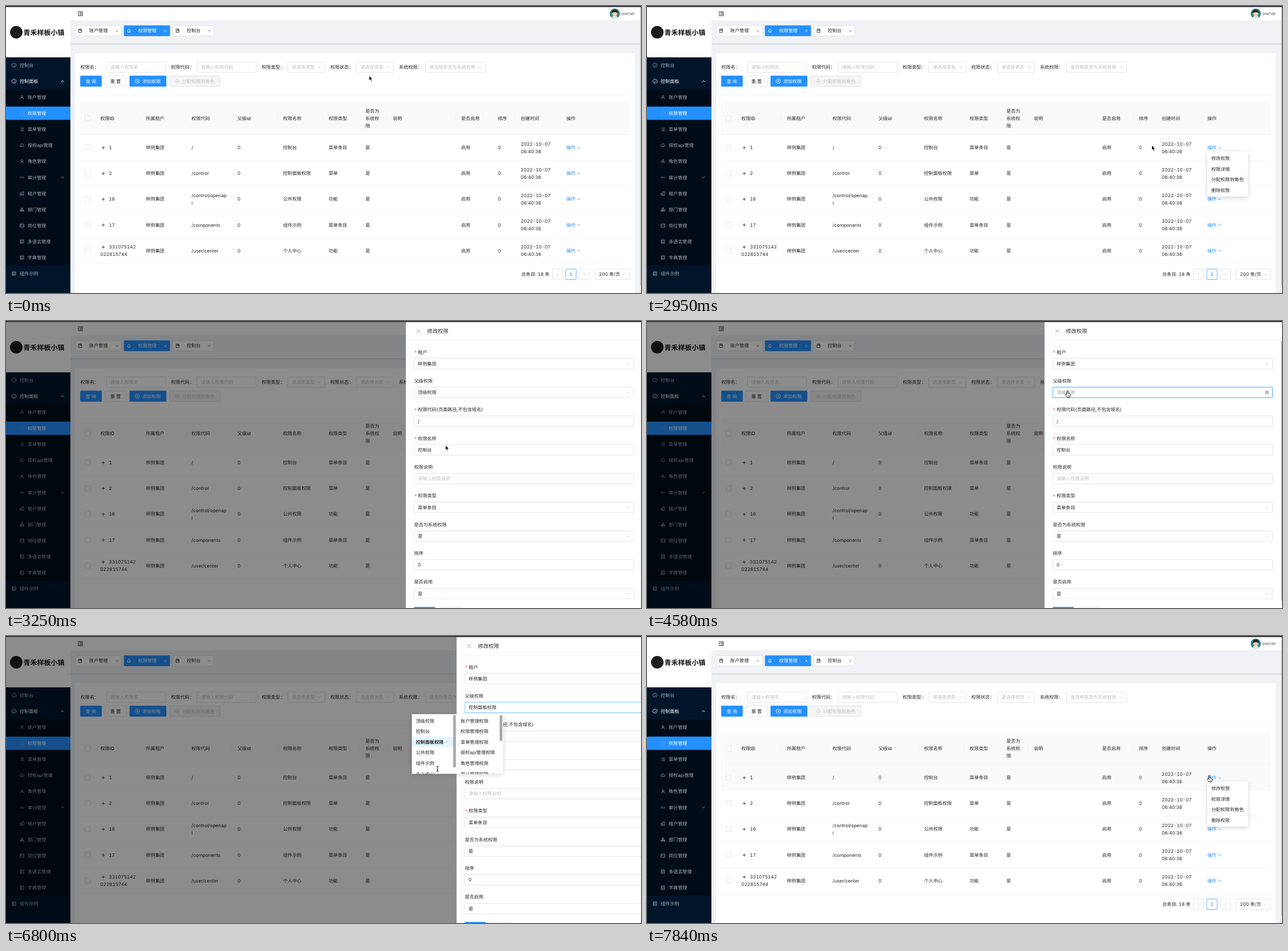
These frames come from a looping animation (1114x503 px, 7990 ms). An HTML page:

```html
<!DOCTYPE html>
<html lang="zh-CN">
<head>
<meta charset="utf-8">
<title>权限管理</title>
<style>
html, body { margin: 0; width: 100%; height: 100%; overflow: hidden; background: #f0f2f5; }
svg { display: block; width: 100%; height: 100%; }
text {
  font: 8.12px Inter, "Noto Sans CJK SC", "Noto Sans CJK", "Noto Sans", sans-serif;
  font-variant-numeric: tabular-nums;
  text-rendering: geometricPrecision;
  white-space: pre;
}
.med { font-weight: 500; }
.bold { font-weight: 700; }
.title { font-size: 9.28px; font-weight: 500; }
.brand { font-size: 12px; font-weight: 700; }
.pop { filter: drop-shadow(0 2px 4px rgba(0, 0, 0, .16)); }
</style>
</head>
<body>
<svg id="stage" viewBox="0 0 1114 503"></svg>
<script>
const BLUE = '#2490ff', INK = '#262626', HINT = '#bfbfbf', LINE = '#d9d9d9', SOFT = '#f0f0f0';
const TENANT = '样例集团';

// ---- drawing helpers (boxes are given by their edges, text by its middle line)
const text = (x, cy, s, fill = INK, cls = '', extra = '') =>
  `<text x="${x}" y="${cy + 3}" fill="${fill}" class="${cls}" ${extra}>${s}</text>`;
const rect = (x1, y1, x2, y2, fill, extra = '') =>
  `<rect x="${x1}" y="${y1}" width="${x2 - x1}" height="${y2 - y1}" fill="${fill}" ${extra}/>`;
const box = (x1, y1, x2, y2, fill = '#fff', stroke = LINE, extra = '') =>
  rect(x1, y1, x2, y2, fill, `rx="1" stroke="${stroke}" stroke-width=".7" ${extra}`);
const path = (d, stroke = INK, w = .8, fill = 'none') =>
  `<path d="${d}" stroke="${stroke}" stroke-width="${w}" fill="${fill}" stroke-linejoin="round"/>`;
const at = (x, y, s) => `<g transform="translate(${x} ${y})">${s}</g>`;
const group = (id, s, extra = '') => `<g id="${id}" ${extra}>${s}</g>`;
const down = (x, y, c = HINT) => at(x, y, path('M-2.6-1.3L0 1.4L2.6-1.3', c));
const cross = (x, y, r, c) => at(x, y, path(`M${-r} ${-r}L${r} ${r}M${r} ${-r}L${-r} ${r}`, c, .7));
const hline = (x1, x2, y, c = SOFT) => path(`M${x1} ${y}H${x2}`, c, .6);

const ICONS = {
  gauge: 'M-2.5 2.8A3.8 3.8 0 1 1 2.5 2.8ZM0 .8L1.6-1.2',
  user: 'M-1.7-1.4a1.7 1.7 0 1 1 3.4 0a1.7 1.7 0 1 1-3.4 0M-3 3Q-2.6.6 0 .6T3 3',
  list: 'M-1.6-2.4H3.4M-1.6 0H3.4M-1.6 2.4H3.4M-3.4-2.4h.8M-3.4 0h.8M-3.4 2.4h.8',
  cloud: 'M-2 2.4A1.9 1.9 0 0 1-2.3-1.2A2.4 2.4 0 0 1 2.3-1.2A1.9 1.9 0 0 1 2 2.4M-1 1.4a1 1 0 1 1 2 0a1 1 0 1 1-2 0',
  code: 'M-1.8-1.6L-3.4 0L-1.8 1.6M1.8-1.6L3.4 0L1.8 1.6M0-1.6V1.6',
  house: 'M-3.4 3V-.5H0V-3H3V3ZM-2 1.2H1.6',
  tree: 'M-.9-3H.9V-1.2H-.9ZM0-1.2V.3M-2.6 1.5V.3H2.6V1.5M-3.4 1.5h1.6V3h-1.6ZM1.8 1.5h1.6V3h-1.6ZM-.8 1.5H.8V3H-.8Z',
  card: 'M-3.6-2.8H3.6V2.8H-3.6ZM-2.2-.4a.8.8 0 1 1 1.6 0a.8.8 0 1 1-1.6 0M1-1H2.6M1 .8H2.6',
  book: 'M-3-3H3V3H-3ZM-1.4-3V3M0-1H2M0 1H2',
  fold: 'M-4.6-3.4H4.6M-1.2-1.2H4.6M-1.2 1.2H4.6M-4.6 3.4H4.6M-2.4-1.6L-4.4 0L-2.4 1.6',
  page: 'M-2.6-3H2.6V3H-2.6ZM-.6-3V.2L.4-.6L1.4.2V-3',
  bell: 'M-2 2V-.4A2 2 0 0 1 2-.4V2M-2.8 2H2.8M-.6 3.2H.6M0-2.4V-3.2',
  add: 'M-3.8 0a3.8 3.8 0 1 1 7.6 0a3.8 3.8 0 1 1-7.6 0M-1.8 0H1.8M0-1.8V1.8'
};
const icon = (name, x, y, c, w = .8) => at(x, y, path(ICONS[name], c, w));

// ---- page
function sidebar() {
  const dim = '#a6adb4', step = 28.1;
  const subs = [['账户管理', 'user'], ['权限管理', 'gauge'], ['菜单管理', 'list'], ['授权api管理', 'cloud'],
    ['角色管理', 'user'], ['审计管理', 'code'], ['租户管理', 'house'], ['部门管理', 'tree'],
    ['岗位管理', 'card'], ['多语言管理', 'book'], ['字典管理', 'book']];
  return rect(0, 2, 113, 90, '#fff') +
    '<circle cx="18" cy="46" r="11" fill="#1a1a1a"/>' + text(30.5, 46.3, '青禾样板小镇', '#111', 'brand', 'dy="1.4"') +
    rect(0, 90, 113, 503, '#001529') + rect(0, 146, 113, 455, '#000c17') + rect(0, 176.3, 113, 199.6, BLUE) +
    icon('gauge', 14, 104, dim) + text(24, 104, '控制台', dim) +
    icon('gauge', 14, 132, '#fff') + text(24, 132, '控制面板', '#fff', 'med') +
    path('M96.6 133.3L99.2 130.7L101.8 133.3', '#fff', 1) +
    subs.map(([s, ic], i) => {
      const y = 160 + i * step, c = i === 1 ? '#fff' : dim;
      return icon(ic, 28, y, i === 1 ? '#5f9fd8' : dim, .7) + text(38, y, s, c);
    }).join('') + down(99.2, 300, dim) +
    icon('book', 14, 469, dim) + text(24, 469, '组件示例', dim);
}

function topBar() {
  const avatar = '<circle r="9" fill="#2b8c83"/><path d="M-5.4 7.2Q-4 3.4 0 3.4T5.4 7.2A9 9 0 0 1-5.4 7.2Z" fill="#e9e4e0"/>' +
    '<circle cy="-.2" r="4.6" fill="#f0cdb8"/><path d="M-5.4 0Q-6-6.6 0-6.8T5.4 0Q4-2.6 0-2.6T-5.4 0Z" fill="#1f1c20"/>';
  const tab = (x1, x2, s, on) => {
    const c = on ? '#fff' : INK;
    return box(x1, 34.3, x2, 52.4, on ? BLUE : '#fff', on ? BLUE : LINE) +
      icon(on ? 'bell' : 'page', x1 + 8.4, 43.4, c) + text(x1 + 24.6, 43.4, s, c) +
      cross(x2 - 7.8, 43.6, 2, on ? '#fff' : '#777');
  };
  return rect(113, 2, 1114, 25, '#fff') + icon('fold', 130.4, 13.5, INK, 1) +
    at(1068, 13.3, avatar) + text(1079.5, 13.4, 'owner', '#666') +
    rect(113, 65.6, 1112, 66.8, '#cfd1d4') + rect(113, 66.8, 1112, 68.5, '#e6e8eb') +
    tab(121.5, 202.3, '账户管理') + tab(207.2, 287.3, '权限管理', true) + tab(292.5, 364.5, '控制台');
}

function filters() {
  const field = (x, label, x1, x2, hint, select) => text(x, 107, label + '：') + box(x1, 98, x2, 116.3) +
    text(x1 + 6.8, 107, hint, HINT) + (select ? down(x2 - 9.6, 107.2) : '');
  const button = (x1, x2, tx, s, fill, stroke, c) => box(x1, 122.4, x2, 141, fill, stroke) + text(tx, 131.7, s, c);
  return field(130.5, '权限名', 176.3, 280, '请输入权限名') + field(289.5, '权限代码', 335.3, 439, '请输入权限代码') +
    field(448.5, '权限类型', 494.3, 559.5, '请选择类型', 1) + field(569, '权限状态', 614.8, 680, '请选择状态', 1) +
    field(689.5, '系统权限', 735.5, 841.3, '请选择是否为系统权限', 1) +
    group('focus', box(614.8, 98, 680, 116.3, 'none', '#cfe6ff', 'style="stroke-width:2.6"') +
      box(614.8, 98, 680, 116.3, 'none', '#40a0ff', 'style="stroke-width:.9"')) +
    button(130.5, 167.8, 139.8, '查 询', BLUE, BLUE, '#fff') + button(173.8, 211, 183, '重 置', '#fff', LINE, INK) +
    button(217, 281, 239, '添加权限', BLUE, BLUE, '#fff') + icon('add', 230.4, 131.7, '#fff') +
    button(287.2, 375.7, 309, '分配权限到角色', '#f5f5f5', LINE, HINT) + icon('cloud', 300.4, 131.7, HINT) +
    hline(130, 1094, 156);
}

function table() {
  const check = y => box(138.6, y - 4.6, 147.8, y + 4.6);
  const heads = [[165.5, '权限ID'], [245.5, '所属租户'], [325.5, '权限代码'], [406, '父级id'], [486, '权限名称'],
    [566, '权限类型'], [678.5, '说明'], [798.5, '是否启用'], [863, '排序'], [903, '创建时间'], [983, '操作']];
  const rows = [['1', '/', '控制台', '菜单条目'], ['2', '/control', '控制面板权限', '菜单'],
    ['16', '/control/openap|i', '公共权限', '功能'], ['17', '/components', '组件示例', '菜单条目'],
    ['331075142|022815744', '/user/center', '个人中心', '功能']];
  let s = rect(130, 168, 1094, 225.4, '#fafafa') + check(197) +
    heads.map(([x, h], i) => text(x, 197, h, INK, 'med') + (i ? path(`M${x - 9.6} 190.5V203.5`, '#ececec', .6) : '')).join('') +
    ['是否为', '系统权', '限'].map((h, i) => text(630.5, 184 + 13 * i, h, INK, 'med')).join('') +
    path('M620.8 190.5V203.5', '#ececec', .6) + hline(130, 1094, 225.5) +
    group('hover', rect(130, 225.8, 1094, 270.3, '#fafafa'));
  rows.forEach(([id, code, name, kind], i) => {
    const y = 248.1 + i * 45.15, ids = id.split('|'), codes = code.split('|');
    const top = y - (ids.length - 1) * 6.5;
    s += check(y) + path(`M167.8 ${top + .3}H173.4M170.6 ${top - 2.5}V${top + 3.1}`, INK, .8) + text(180.4, top, ids[0]);
    if (ids[1]) s += text(165.5, y + 6.5, ids[1]);
    codes.forEach((c, k) => s += text(325.5, y + (codes.length - 1) * -6.5 + 13 * k, c));
    s += text(245.5, y, TENANT) + text(406, y, '0') + text(486, y, name) + text(566, y, kind) + text(630.5, y, '是') +
      text(798.5, y, '启用') + text(863, y, '0') + text(903, y - 6.3, '2022-10-07') + text(903, y + 6.5, '06:40:36') +
      text(983, y, '操作', BLUE) + down(1004.6, y + .2, BLUE) + hline(130, 1094, y + 22.6);
  });
  return s + text(904, 470, '总条目: 18 条') + box(958.6, 461, 976.8, 479.4) + path('M969 467.6L966.3 470.2L969 472.8', HINT) +
    box(982, 461, 1000.2, 479.4, '#fff', BLUE) + text(991.1, 470, '1', BLUE, 'med', 'text-anchor="middle"') +
    box(1005.4, 461, 1023.6, 479.4) + path('M1013.2 467.6L1015.9 470.2L1013.2 472.8', HINT) +
    box(1033.5, 461, 1093.8, 479.4) + text(1040.3, 470, '200 条/页') + down(1084, 470.2);
}

// ---- drawer: label, value, required, select
const FIELDS = [['租户', TENANT, 1, 1], ['父级权限', '顶级权限', 0, 1], ['权限代码(页面路径,不包含域名)', '/', 1, 0],
  ['权限名称', '控制台', 1, 0], ['权限说明', '请输入权限说明', 0, 0], ['权限类型', '菜单条目', 1, 1],
  ['是否为系统权限', '是', 0, 1], ['排序', '0', 0, 0], ['是否启用', '是', 0, 1]];
function drawer() {
  return rect(697.5, 2, 1116, 503, '#fff') + cross(719.6, 17.6, 3.2, '#777') + text(735, 17.6, '修改权限', INK, 'title') +
    hline(697.5, 1116, 34) +
    FIELDS.map(([label, value, must, select], i) => {
      const y = 54.5 + i * 50.37, iy = y + 20.3;
      return (must ? text(712, y + .6, '*', '#ff4d4f') : '') + text(must ? 718.8 : 712, y, label) +
        box(712, iy - 9.2, 1097.6, iy + 9.2, '#fff', LINE, `id="field${i}"`) +
        text(718.6, iy, value, i === 4 ? HINT : INK, '', `id="value${i}"`) +
        (select ? group('arrow' + i, down(1087.6, iy + .2)) : '');
    }).join('') +
    group('clear', '<circle cx="1087.6" cy="125.2" r="3.2" fill="#b0b0b0"/>' + cross(1087.6, 125.2, 1.2, '#fff')) +
    box(712, 501.5, 748.7, 520, BLUE, BLUE) + box(757.5, 501.5, 795, 520) +
    rect(1112.6, 36, 1114, 490, '#a8a8a8');
}

// ---- popups
const popup = (id, x1, y1, x2, y2, s) => group(id, rect(x1, y1, x2, y2, '#fff', 'rx="1" class="pop"') + s);
const lines = (x, y, gap, list) => list.map((s, i) => text(x, y + gap * i, s)).join('');
function popups() {
  const next = (x, y) => path(`M${x - 1.2} ${y - 2}L${x + 1} ${y}L${x - 1.2} ${y + 2}`, '#999', .7);
  const bar = (x, y2) => rect(x, 138.5, x + 4.8, y2, '#a9a9a9', 'rx="2.2"');
  const y0 = 148.6, gap = 18.75;
  const first = ['顶级权限', '控制台', '控制面板权限', '公共权限', '组件示例', '个人中心'];
  const second = ['账户管理权限', '权限管理权限', '菜单管理权限', '授权api管理权限', '角色管理权限', '审计管理权限'];
  const mark = (id, i) => group(id, rect(712, y0 + gap * i - 9.3, 784.5, y0 + gap * i + 9.3, '#e6f7ff') +
    text(719, y0 + gap * i, first[i], INK, 'bold'));
  const column = first.map((s, i) => text(719, y0 + gap * i, s, INK, '', `id="opt${i}"`)).join('');
  return popup('states', 614.8, 119.4, 680, 161.6, lines(621.6, 131.2, 18.6, ['启用', '禁用'])) +
    popup('menu', 983, 255, 1054.3, 334, lines(990, 266.9, 18.6, ['修改权限', '权限详情', '分配权限到角色', '删除权限'])) +
    group('cascade',
      group('wide', rect(712, 137, 872, 242.2, '#fff', 'class="pop"')) +
      group('narrow', rect(712, 137, 790, 242.2, '#fff', 'class="pop"')) +
      '<clipPath id="cut"><rect x="712" y="137" width="160" height="105.2"/></clipPath><g clip-path="url(#cut)">' +
      mark('mark0', 0) + mark('mark2', 2) + column + next(773, y0 + gap * 2) + bar(784.4, 231) +
      group('second', path('M790 137V242.2', SOFT, .6) + lines(797.6, y0, gap, second) + next(855, y0 + gap * 5) + bar(866, 184.5)) +
      '</g>');
}

function cursors() {
  const finger = 'M-1.2 6V.6Q-1.2-.6 0-.6T1.1.6V4Q4.4 3.6 5.2 5.4Q5.6 8.4 3.8 10.6H-.6Q-2 8.6-3 7Q-3.6 5.4-2.4 5.4Z';
  return group('arrow', path('M0 0V9L2.1 7.1L3.6 10.3L5.1 9.6L3.6 6.5H6.4Z', '#fff', .9, '#000')) +
    group('hand', path(finger, '#000', .9, '#fff') + path('M.8 7V9M2.6 7V9', '#000', .5)) +
    group('beam', path('M-2-4.5Q0-4.5 0-3.5Q0-4.5 2-4.5M0-3.5V3.5M-2 4.5Q0 4.5 0 3.5Q0 4.5 2 4.5M-1 1.4H1', '#000', .9));
}

document.getElementById('stage').innerHTML =
  rect(0, 0, 1114, 503, '#f0f2f5') + topBar() + rect(121.3, 83, 1103, 503, '#fff') + filters() + table() +
  rect(1112.6, 2, 1114, 490, '#c4c4c4') + sidebar() +
  group('mask', rect(0, 0, 1114, 503, '#000')) + group('drawer', drawer()) + popups() +
  rect(0, 0, 1114, 2, '#3d4043') + group('cursor', cursors());

const LOOP = 7990, TICK = 147.9, LAST = 53;
const PATH = [[0, 637, 122], [1, 636, 114], [2, 634, 105], [4, 632, 106], [5, 624, 106], [6, 624, 106], [7, 690, 130],
  [11, 965, 235], [12, 992, 246], [13, 992.5, 247.5], [14, 993, 249], [17, 997, 266], [19, 997, 266], [21, 774, 222],
  [27, 756, 195], [28, 752, 130], [29, 746, 78], [31, 737.7, 122.8], [33, 737.7, 122.8], [35, 738, 170], [37, 745, 183],
  [42, 745, 183], [43, 715, 195], [45, 610.5, 221], [46, 757, 233], [49, 960, 252], [50, 990, 250], [53, 986.5, 245]];
const SHIFT = [[20, 420], [21, 140.5], [22, 4], [23, 0], [45, 0], [46, 93], [47, 385], [48, 420]];
const STATES = [[1, 0], [2, .88], [3, 1], [4, 1], [5, 0]];
const MENU = [[11, 0], [12, .88], [13, .986], [14, 1], [21, 1], [22, 0], [51, 0], [52, .92], [53, 1]];
const CASCADE = [[31, 0], [32, .9], [33, 1], [45, 1], [46, .994], [47, 0]];

function track(keys, n, k = 1) {
  if (n <= keys[0][0]) return keys[0][k];
  for (let i = 1; i < keys.length; i++) {
    const a = keys[i - 1], b = keys[i];
    if (n <= b[0]) return a[k] + (b[k] - a[k]) * (n - a[0]) / (b[0] - a[0]);
  }
  return keys[keys.length - 1][k];
}

const $ = id => document.getElementById(id);
const show = (id, on) => $(id).setAttribute('visibility', on ? 'inherit' : 'hidden');
const within = (n, a, b) => n >= a && n <= b;

function unfold(id, top, s) {
  show(id, s > 0);
  $(id).setAttribute('transform', `translate(0 ${top * (1 - s)}) scale(1 ${s || 1})`);
  $(id).setAttribute('opacity', Math.min(1, Math.max(0, (s - .8) / .15)));
}

function border(i, c, w) {
  $('field' + i).setAttribute('stroke', c);
  $('field' + i).setAttribute('stroke-width', w);
}

function draw(n) {
  show('focus', within(n, 2, 19));
  show('hover', within(n, 12, 14) || n >= 50);
  unfold('states', 119.4, track(STATES, n));
  unfold('menu', 255, track(MENU, n));
  unfold('cascade', 137, track(CASCADE, n));

  const shift = track(SHIFT, n);
  show('drawer', shift < 418);
  $('drawer').setAttribute('transform', `translate(${shift} 0)`);
  $('mask').setAttribute('opacity', .45 * Math.min(1, 1.4 * (1 - shift / 420)));

  const chosen = n >= 41, editing = within(n, 31, 45), clear = within(n, 30, 34);
  for (const id of ['wide', 'second', 'mark2']) show(id, chosen);
  for (const id of ['narrow', 'mark0', 'opt2']) show(id, !chosen);
  show('opt0', chosen);
  show('clear', clear);
  show('arrow1', !clear);
  $('value1').textContent = chosen ? '控制面板权限' : '顶级权限';
  $('value1').setAttribute('fill', editing ? '#a0a0a0' : INK);
  border(0, n === 29 ? '#40a9ff' : LINE, .7);
  border(1, within(n, 30, 47) ? '#40a9ff' : LINE, within(n, 31, 45) ? 1 : .7);

  const hand = within(n, 1, 6) || within(n, 12, 19) || within(n, 28, 42) || n >= 50;
  show('hand', hand);
  show('beam', n === 46);
  show('arrow', !hand && n !== 46);
  $('cursor').setAttribute('transform', `translate(${track(PATH, n, 1)} ${track(PATH, n, 2)})`);
}

let shown = -1;
function loop() {
  const n = Math.min(LAST, Math.floor((performance.now() % LOOP + 12) / TICK));
  if (n !== shown) draw(shown = n);
  requestAnimationFrame(loop);
}
loop();
</script>
</body>
</html>
```
